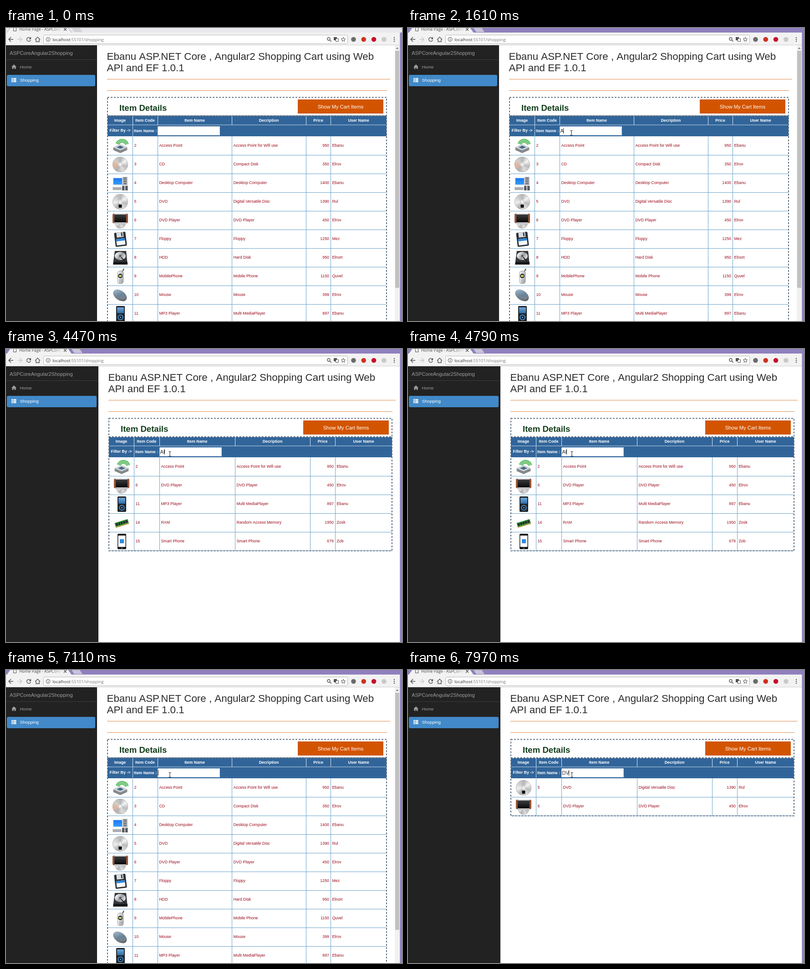
Recreate the animation shown at these times as an HTML page with a canvas. Size 870x644 px, loop 8 s.

```html
<!DOCTYPE html>
<html lang="en">
<head>
<meta charset="utf-8">
<title>Shopping cart filter</title>
<style>
html, body { margin: 0; width: 100%; height: 100%; overflow: hidden; background: #fff; }
canvas { display: block; }
</style>
</head>
<body>
<canvas id="stage" width="870" height="644"></canvas>
<script>
const ctx = document.getElementById('stage').getContext('2d');
const LOOP = 8000, BLINK = 530, ROW = 41;
const SANS = '"Liberation Sans", Arial, sans-serif';
const UI = '"Open Sans", sans-serif';
const RED = '#9a0a1c', BLUE = '#31659a', GRID = '#6ba2c9', INK = '#505050', ORANGE = '#e08a4c';

// ---- drawing helpers ----
function rect(x, y, w, h, c) { ctx.fillStyle = c; ctx.fillRect(x, y, w, h); }

function round(x, y, w, h, r, fill, stroke) {
  ctx.beginPath();
  ctx.roundRect(x, y, w, h, r);
  if (fill) { ctx.fillStyle = fill; ctx.fill(); }
  if (stroke) { ctx.strokeStyle = stroke; ctx.lineWidth = 1; ctx.stroke(); }
}

function trace(p) {
  ctx.beginPath();
  for (let i = 0; i < p.length; i += 2) ctx.lineTo(p[i], p[i + 1]);
}

function poly(c, ...p) { trace(p); ctx.closePath(); ctx.fillStyle = c; ctx.fill(); }

function line(c, w, ...p) { trace(p); ctx.strokeStyle = c; ctx.lineWidth = w; ctx.stroke(); }

function dashes(c, w, dash, draw) {
  ctx.setLineDash(dash);
  ctx.strokeStyle = c;
  ctx.lineWidth = w;
  draw();
  ctx.setLineDash([]);
}

function oval(x, y, rx, ry, c) {
  ctx.beginPath();
  ctx.ellipse(x, y, rx, ry, 0, 0, 7);
  ctx.fillStyle = c;
  ctx.fill();
}

function dot(x, y, r, c) { oval(x, y, r, r, c); }

function arc(x, y, r, a, b, c, w) {
  ctx.beginPath();
  ctx.arc(x, y, r, a, b);
  ctx.strokeStyle = c;
  ctx.lineWidth = w;
  ctx.stroke();
}

function ring(x, y, r, c, w) { arc(x, y, r, 0, 2 * Math.PI, c, w); }

function text(s, x, y, size, c, { bold, align = 'left', face = SANS } = {}) {
  ctx.font = `${bold ? 'bold ' : ''}${size}px ${face}`;
  ctx.textAlign = align;
  ctx.fillStyle = c;
  ctx.fillText(s, x, y);
}

function fade(x0, y0, x1, y1, ...colors) {
  const g = ctx.createLinearGradient(x0, y0, x1, y1);
  colors.forEach((c, i) => g.addColorStop(i / (colors.length - 1), c));
  return g;
}

function placed(x, y, turn, draw) {
  ctx.save();
  ctx.translate(x, y);
  ctx.rotate(turn);
  draw();
  ctx.restore();
}

// ---- item pictures, drawn around (0, 0) ----
function disc(y, r, tint) {
  const g = ctx.createConicGradient(-0.6, 0, y);
  ['#f4f4f4', '#bcbcbe', '#dedede', '#b2b2b4', tint, '#cfcfcf', '#b6b6b8', '#f4f4f4']
    .forEach((c, i, all) => g.addColorStop(i / (all.length - 1), c));
  dot(0, y, r, g);
  ring(0, y, r - 0.5, '#aeaeb0', 0.8);
  dot(0, y, r * 0.3, '#d6d6d6');
  dot(0, y, r * 0.13, '#fff');
}

const pictures = {
  'Access Point'() {
    for (let r = 8; r < 15; r += 3) arc(4, 0, r, 3.5, 6, '#52b85a', 2.2);
    const slab = (y, s, c) => poly(c, -16 * s, y, 0, y - 7 * s, 16 * s, y, 0, y + 7 * s);
    for (let y = 9; y > 3; y--) slab(y, 1, '#85898e');
    slab(3, 1, '#cfd2d6');
    slab(3, 0.5, '#486a88');
  },
  'CD'() { disc(0, 17, '#e6b496'); },
  'Desktop Computer'() {
    rect(5, -14, 11, 19, '#b9bdc2');
    for (let y = -12; y < 4; y += 4) rect(7, y, 7, 2, '#595d62');
    rect(-16, -12, 21, 17, '#dfe3e8');
    rect(-15, -11, 19, 14, fade(0, -11, 0, 3, '#1e78ef', '#2f9bff'));
    rect(-17, 8, 20, 7, '#cfd2d5');
    for (let y = 10; y < 15; y += 2) rect(-16, y, 18, 1, '#85898d');
    for (const x of [4, 11]) rect(x, 6, 5.5, 10, '#565b61');
  },
  'DVD'() { disc(0, 17, '#efefef'); rect(-3.5, 6, 7, 7, '#111'); },
  'DVD Player'() {
    disc(6, 12, '#efefef');
    round(-17, -15, 34, 21, 3, '#96553a');
    rect(-13, -15, 26, 23, '#c4c4c6');
    rect(-13, -13, 26, 17, fade(0, -13, 0, 4, '#3c3c3e', '#080808'));
  },
  'Floppy'() {
    placed(0, 0, -0.12, () => {
      round(-12, -15, 25, 31, 2, '#2b3036');
      rect(-7, -15, 15, 11, '#d9dce0');
      rect(3, -14, 3, 8, '#40454c');
      rect(-9, -1, 19, 14, '#f5f7f9');
      rect(-9, -1, 19, 5, '#2d86d9');
    });
  },
  'HDD'() {
    poly('#36383b', -12, -15, 13, -15, 16, 15, -16, 15);
    oval(0, -4, 12, 9, fade(-10, -10, 10, 4, '#fff', '#9b9ea2', '#eceded'));
    dot(0, -4, 2.5, '#55585c');
    line('#222', 2, 11, 8, 2, -1);
    rect(-15, 9, 31, 6, '#17181a');
  },
  'MobilePhone'() {
    line('#4a4a4a', 2, 5, -11, 8, -17);
    round(-6, -12, 13, 28, 5, fade(-6, 0, 7, 0, '#fafafa', '#aeb0b3'), '#9a9ca0');
    dot(0, -1, 5, '#2f3134');
    rect(-3, -3, 6, 4, '#cbd85a');
    for (let i = 0; i < 9; i++) rect(-3 + i % 3 * 3, 7 + Math.floor(i / 3) * 3, 2, 1.5, '#85888c');
  },
  'Mouse'() {
    placed(0, 0, 0.6, () => {
      oval(0, 1, 16.5, 10.5, fade(-16, 0, 16, 0, '#8494a1', '#5e6266'));
      oval(-1, -1, 15, 8.5, fade(-12, -8, 12, 8, '#9db5c8', '#6a8499', '#7d8185'));
    });
  },
  'MP3 Player'() {
    round(-9, -17, 19, 34, 2, '#202326');
    rect(-7, -14, 15, 13, fade(0, -14, 0, -1, '#6ea9dc', '#2f6ca8'));
    ['#3f7eb5', '#14181c', '#89b8dd'].forEach((c, i) => dot(0.5, 8, 6.5 - i * 2.5, c));
  },
  'RAM'() {
    placed(0, 0, -0.3, () => {
      rect(-15, -4, 30, 9, '#2f8a35');
      rect(-15, 5, 30, 2, '#b99a3c');
      for (let x = -13; x < 12; x += 5.5) rect(x, -2, 4, 5, '#23282a');
    });
  },
  'Smart Phone'() {
    round(-9, -17, 19, 34, 2, '#17181a');
    rect(-7.5, -13, 16, 25, '#fff');
    rect(-4, -5, 9, 9, '#2e8ee0');
    rect(-1, 14, 3, 1.5, '#9a9a9a');
  }
};

// ---- content: code, name, description, price, user ----
const items = `2|Access Point|Access Point for Wifi use|950|Ebanu
3|CD|Compact Disk|350|Elrov
4|Desktop Computer|Desktop Computer|1400|Ebanu
5|DVD|Digital Versatile Disc|1390|Rul
6|DVD Player|DVD Player|450|Elrov
7|Floppy|Floppy|1250|Mez
8|HDD|Hard Disk|950|Elnort
9|MobilePhone|Mobile Phone|1150|Quvel
10|Mouse|Mouse|399|Elrov
11|MP3 Player|Multi MediaPlayer|897|Ebanu
14|RAM|Random Access Memory|1950|Zosk
15|Smart Phone|Smart Phone|679|Zob`.split('\n').map(row => {
  const [code, name, about, price, user] = row.split('|');
  return { code, name, about, price, user };
});
const heads = ['Image', 'Item Code', 'Item Name', 'Decription', 'Price', 'User Name'];
const shares = [55, 55, 163, 163, 54, 123];

// Columns share the table width in fixed proportions.
function layout(left, right) {
  const unit = (right - left - 2) / shares.reduce((a, b) => a + b);
  const cols = [left + 1];
  shares.forEach((s, i) => cols.push(cols[i] + s * unit));
  return { side: left - 22, left, right, cols: cols.map(Math.floor) };
}
const narrow = layout(222, 837), wide = layout(225, 849);

// ---- timeline: the filter runs a moment after the keys ----
const FOCUS = 1130;
const events = [
  { t: FOCUS, typed: '', query: '' },
  { t: 1540, typed: 'A', query: '' },
  { t: 3460, typed: 'Af', query: '' },
  { t: 4470, typed: 'Af', query: 'a' },
  { t: 4710, typed: 'Af', query: 'a' },
  { t: 6260, typed: 'A', query: 'a' },
  { t: 6790, typed: '', query: 'a' },
  { t: 7110, typed: '', query: '' },
  { t: 7500, typed: 'D', query: '' },
  { t: 7720, typed: 'DV', query: 'd' },
  { t: 7970, typed: 'DV', query: 'dv' }
];

// ---- browser window ----
function browser(active) {
  const edge = '#a7a3b2';
  rect(0, 0, 870, 10, active ? '#8f7fbe' : '#e9e8ec');
  poly('#f2f2f2', 2, 10, 9, 0, 137, 0, 144, 10);
  line(edge, 1, 2, 10, 9, 0);
  line(edge, 1, 137, 0, 144, 10);
  poly(active ? '#c9c3da' : '#d3d2d6', 144, 0, 162, 0, 168, 9, 150, 9);
  rect(0, 10, 866, 28, '#f2f2f2');
  ctx.strokeStyle = INK;
  ctx.lineWidth = 1;
  ctx.strokeRect(16.5, -3.5, 6, 10);
  text('Home Page - ASPCoreA', 29, 6, 8.9, fade(100, 0, 121, 0, '#444', '#ddd'), { face: UI });
  for (const d of [-3, 3]) line(INK, 1.3, 130 - d, 0, 130 + d, 6);

  const arrow = (x, d, c) => {
    line(c, 1.5, x - 5 * d, 25, x + 5 * d, 25);
    line(c, 1.5, x, 20, x - 5 * d, 25, x, 30);
  };
  arrow(11, 1, INK);
  arrow(30, -1, '#c9c9c9');
  arc(50, 25, 4.3, 0.3, 5.4, INK, 1.5);
  poly(INK, 55, 19.5, 55, 24.5, 50, 24.5);
  line(INK, 1.4, 64, 25.5, 69.5, 20, 75, 25.5);
  line(INK, 1.4, 66, 25, 66, 30, 73, 30, 73, 25);

  round(82.5, 15.5, 668, 19, 2, '#fff', '#b9b9b9');
  ring(92.5, 25, 4.3, INK, 1.1);
  line(INK, 1.2, 92.5, 24, 92.5, 27.5);
  dot(92.5, 22.6, 0.7, INK);
  text('localhost', 102, 28.7, 9.4, '#2b2b2b', { face: UI });
  text(':55101/shopping', 102 + ctx.measureText('localhost').width, 28.7, 9.4, '#777', { face: UI });

  ring(709, 24, 3, INK, 1.3);
  line(INK, 1.5, 711, 26, 715, 30);
  rect(720, 20, 7, 7, INK);
  round(724.5, 23.5, 6, 6, 0, '#fff', INK);
  const star = [];
  for (let i = 0; i <= 10; i++) {
    const a = i * Math.PI / 5, r = i % 2 ? 2.2 : 5;
    star.push(741 + r * Math.sin(a), 25.3 - r * Math.cos(a));
  }
  line(INK, 1, ...star);
  ['#6b6b6b', '#d0301f', '#c70d2c', '#c9c9c9'].forEach((c, i) => dot(763.5 + i * 22.3, 25, 5.3, c));
  for (let y = 21; y < 30; y += 4) dot(853, y, 1.2, INK);
  rect(0, 37, 866, 1, '#cfcfcf');
}

function sidebar(w) {
  const grey = '#9d9d9d';
  rect(0, 38, w, 606, '#222');
  text('ASPCoreAngular2Shopping', 8, 58.5, 11.2, grey);
  rect(0, 69, w, 1, '#3d3d3d');
  poly(grey, 12, 85.5, 17.5, 80, 23, 85.5);
  rect(13.5, 85, 8, 5, grey);
  rect(16.5, 87, 2, 3, '#222');
  text('Home', 30.5, 89, 9.7, grey);
  round(2, 103, w - 6, 25, 3, '#4189c8');
  for (let y = 110; y < 119; y += 3.3) {
    rect(12, y, 3, 2.4, '#fff');
    rect(16, y, 6.5, 2.4, '#fff');
  }
  text('Shopping', 30.5, 118.2, 9.8, '#fff');
}

function scrollbar() {
  rect(854, 38, 11, 606, '#f1f1f1');
  poly('#7d7d7d', 856.5, 46, 859.5, 42.5, 862.5, 46);
  rect(855, 50, 9, 521, '#c1c1c1');
}

function heading({ left, right }) {
  text('Ebanu ASP.NET Core , Angular2 Shopping Cart using Web', left - 0.5, 70.3, 22.35, '#2b2b2b');
  text('API and EF 1.0.1', left - 0.5, 95, 22.35, '#2b2b2b');
  rect(left, 112, right + 7 - left, 1, ORANGE);
  rect(left, 137, right - left, 1, ORANGE);

  text('Item Details', left + 27, 182, 18.6, '#123d1b', { bold: true });
  const x = right - 196;
  rect(x, 157, 188, 31, '#d35400');
  dashes('#b8612f', 1, [2, 2], () => ctx.strokeRect(x + 0.5, 157.5, 187, 30));
  text('Show My Cart Items', x + 94, 177, 11.2, '#fff', { align: 'center' });
}

function table({ left, right, cols }, rows) {
  const end = 238 + rows.length * ROW, width = cols[6] - cols[0];
  const centre = i => (cols[i] + cols[i + 1]) / 2;
  const label = (s, x, y, align) => text(s, x, y, 8.85, '#fff', { bold: true, align });

  rect(cols[0], 194, width, 44, BLUE);
  rect(cols[0], 212.5, width, 1, '#c3d6e8');
  heads.forEach((h, i) => {
    label(h, centre(i), 206, 'center');
    if (i) rect(cols[i], 194, 1, 19, '#e4edf5');
  });
  rect(cols[1], 213, 1, 25, '#c3d6e8');
  label('Filter By ->', centre(0), 228.3, 'center');
  label('Item Name :', cols[1] + 3, 228.7);

  rows.forEach((item, i) => {
    const y = 238 + i * ROW;
    rect(cols[0], y + ROW, width, 1, GRID);
    placed(centre(0) + 0.5, y + 21, 0, pictures[item.name]);
    const cell = (s, x, align) => text(s, x, y + 22.8, 8.85, RED, { align });
    cell(item.code, cols[1] + 3.4);
    cell(item.name, cols[2] + 3.4);
    cell(item.about, cols[3] + 3.4);
    cell(item.price, cols[5] - 3, 'right');
    cell(item.user, cols[5] + 3.4);
  });
  cols.slice(1, 6).forEach(x => rect(x, 238, 1, end - 238, GRID));

  dashes('#5f7083', 2, [4, 3], () => {
    ctx.strokeRect(left + 1, 152.5, right - left - 2, 40.5);
    ctx.strokeRect(left + 1, 193, right - left - 2, end - 192.5);
  });
}

function field(x, value, focused, caret) {
  rect(x, 216, 137, 20, '#fff');
  dashes(focused ? '#6fa4dc' : '#a9b4bf', 1, [2, 2], () => ctx.strokeRect(x + 0.5, 216.5, 136, 19));
  text(value, x + 1.4, 229.5, 11.2, '#333');
  if (caret) rect(Math.round(x + 0.8 + ctx.measureText(value).width), 220, 1, 12, '#222');
}

// An arrow glides up to the field in steps and becomes a text beam there.
function pointer(t) {
  if (t < 210) return;
  const k = Math.min(1, Math.floor((t - 210) / 80) / 5);
  if (k < 1) {
    const e = k * k * (3 - 2 * k);
    placed(712 - 352 * e, 548 - 329 * e, 0, () => {
      const shape = [0, 0, 0, 16, 4, 12.5, 6.5, 18.5, 9, 17.5, 6.5, 11.5, 11.5, 11.5, 0, 0];
      poly('#fff', ...shape);
      line('#000', 1, ...shape);
    });
    return;
  }
  const x = t > 750 && t < 2220 ? 359 : 360, y = t < 980 ? 219 : 225;
  rect(x - 0.5, y, 1, 11, '#111');
  for (const end of [0, 10]) rect(x - 2.5, y + end, 5, 1, '#333');
}

function draw(t) {
  const now = events.findLast(e => t >= e.t) || events[0];
  const page = now.query ? wide : narrow;
  const rows = items.filter(item => item.name.toLowerCase().includes(now.query));
  const focused = t >= FOCUS;

  rect(0, 0, 870, 644, '#fff');
  browser(t >= 980);
  sidebar(page.side);
  if (page === narrow) scrollbar();
  rect(865, 10, 1, 634, '#b9b1cf');
  rect(866, 10, 4, 634, '#9080c0');
  heading(page);
  table(page, rows);
  field(page.cols[2], now.typed, focused, focused && (t - now.t) % (2 * BLINK) < BLINK);
  pointer(t);
}

function frame() {
  draw(performance.now() % LOOP);
  requestAnimationFrame(frame);
}
frame();
</script>
</body>
</html>
```
